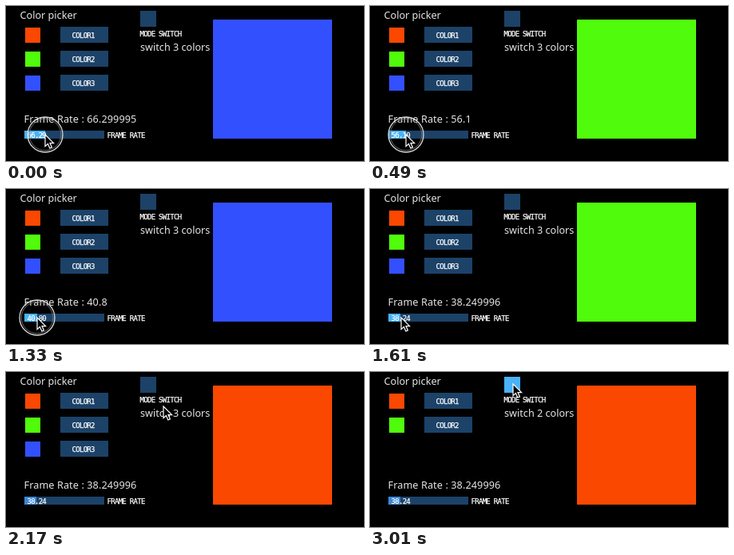
Animation, 448 px wide and 194 px high, one loop 3080 ms. Source, as an HTML page:

```html
<!DOCTYPE html>
<html lang="en">
<head>
<meta charset="utf-8">
<title>Color picker</title>
<style>
  html, body { margin: 0; width: 100%; height: 100%; overflow: hidden; background: #000; }
  svg { display: block; width: 448px; height: 194px; }
  text { white-space: pre; }
  .copy { font: 12.65px "Noto Sans", "Open Sans", sans-serif; fill: #e6e6e6; }
  .rate { letter-spacing: .1px; }
  .label { font: 9px "DejaVu Sans Mono", monospace; letter-spacing: -.7px; fill: #fff; stroke: #fff; stroke-width: .25; }
  .panel { fill: #1c4268; }
  .soft { filter: blur(.7px); }
</style>
</head>
<body>
<svg viewBox="0 0 448 194">
  <rect width="448" height="194"/>
  <text class="copy" x="17.5" y="16">Color picker</text>
  <g id="rows"></g>

  <rect id="toggle" x="168" y="6" width="20" height="20"/>
  <text class="label" x="167.5" y="38">MODE SWITCH</text>
  <text class="copy" id="modeText" x="168" y="56"></text>

  <rect id="stage" class="soft" x="259" y="17" width="149" height="149"/>

  <text class="copy rate" id="rateText" x="22.5" y="146"></text>
  <rect class="panel" x="23" y="156" width="100" height="10"/>
  <rect id="sliderFill" x="23" y="156" height="10"/>
  <text class="label" id="sliderText" x="26.5" y="165"></text>
  <text class="label" x="126.5" y="165">FRAME RATE</text>

  <g id="pointer">
    <g id="ring" fill="none">
      <circle r="22" stroke="#d8d8d8" stroke-width="1.3"/>
      <circle r="19.8" stroke="#777" stroke-width=".9"/>
    </g>
    <path d="M0 0V14.6L3.4 11.5L5.8 17L8.4 15.9L6 10.6H10.6Z" fill="#000" stroke="#fff" stroke-width="1.2"/>
  </g>
</svg>
<script>
const TICK = 70, TICKS = 44;
const COLORS = ['#fa4800', '#50fc0c', '#3350ff'];
const IDLE = '#1c4268', HOVER = '#3a87d6', ACTIVE = '#49b2f8';

// Moments of the pointer's actions, in ticks.
const RELEASE_SLIDER = 23, LEAVE_SLIDER = 25, PRESS_TOGGLE = 40, RELEASE_TOGGLE = 42;

// Seconds of sketch time per tick, and the step the colour cycle starts on.
const TICK_SECONDS = .074, FIRST_STEP = 2.2;

// Tracks are [tick, value] points.
const SLIDER = [[0, 26], [7, 22], [8, 21], [11, 21], [16, 16], [19, 16], [20, 15]];
const POINTER_X = [[24, 39], [31, 197], [36, 178], [43, 179]];
const POINTER_Y = [[24, 161], [31, 43], [36, 14], [43, 15]];

const $ = id => document.getElementById(id);
const set = (id, attrs) => {
  for (const key in attrs) $(id).setAttribute(key, attrs[key]);
};
const linear = u => u;
const smooth = u => u * u * (3 - 2 * u);

function sample(track, t, ease = linear) {
  if (t <= track[0][0]) return track[0][1];
  const i = track.findIndex(([at]) => at >= t);
  if (i < 0) return track[track.length - 1][1];
  const [t0, v0] = track[i - 1], [t1, v1] = track[i];
  return v0 + (v1 - v0) * ease((t - t0) / (t1 - t0));
}

const sliderPx = t => Math.round(sample(SLIDER, t));

// Single-precision slider value, with its small rounding error.
const sliderValue = px => Math.fround(Math.fround(2.55) * px - 1.4e-6);

// The sketch advances one colour per drawn frame, at the slider's frame rate.
function colorSteps(t) {
  let steps = FIRST_STEP;
  for (let k = 0; k < t; k++) steps += sliderValue(sliderPx(k)) * TICK_SECONDS;
  return Math.floor(steps);
}

function colorIndex(t) {
  if (t < PRESS_TOGGLE) return colorSteps(t) % 3;
  const atPress = colorSteps(PRESS_TOGGLE);
  return (atPress % 3 + colorSteps(t) - atPress) % 2;
}

// Shortest decimal that reads back as the same single-precision number.
function floatText(value) {
  let digits = 1;
  while (Math.fround(+value.toPrecision(digits)) !== value) digits++;
  const text = String(+value.toPrecision(digits));
  return text.includes('.') ? text : text + '.0';
}

function shortText(value) {
  const [whole, part] = floatText(value).split('.');
  return `${whole}.${part.padEnd(2, '0').slice(0, 2)}`;
}

$('rows').innerHTML = COLORS.map((color, i) => `
  <g id="row${i}" transform="translate(0 ${30 * i})">
    <rect class="soft" x="24" y="27" width="19" height="19" fill="${color}"/>
    <rect class="panel" x="68" y="26" width="60" height="20"/>
    <text class="label" x="82.5" y="40">COLOR${i + 1}</text>
  </g>`).join('');

function draw(ms) {
  const t = Math.floor(ms / TICK + 1e-6) % TICKS;
  const toggled = t >= PRESS_TOGGLE;
  const dragging = t < RELEASE_SLIDER;
  const pressed = dragging || (toggled && t < RELEASE_TOGGLE);
  const px = sliderPx(t);
  const value = sliderValue(px);
  const x = dragging ? 23 + px : sample(POINTER_X, t, smooth);
  const y = sample(POINTER_Y, t, smooth);
  const overToggle = y < 26 && x >= 168 && x < 188;

  set('stage', { fill: COLORS[colorIndex(t)] });
  set('row2', { visibility: toggled ? 'hidden' : 'visible' });
  set('toggle', { fill: toggled ? ACTIVE : overToggle ? HOVER : IDLE });
  set('sliderFill', { width: px, fill: t < LEAVE_SLIDER ? ACTIVE : HOVER });
  set('pointer', { transform: `translate(${x} ${y})` });
  set('ring', { visibility: pressed ? 'visible' : 'hidden' });

  $('modeText').textContent = `switch ${toggled ? 2 : 3} colors`;
  $('rateText').textContent = `Frame Rate : ${floatText(value)}`;
  $('sliderText').textContent = shortText(value);
}

const start = performance.now();
function loop() {
  draw(performance.now() - start);
  requestAnimationFrame(loop);
}
loop();
</script>
</body>
</html>
```
